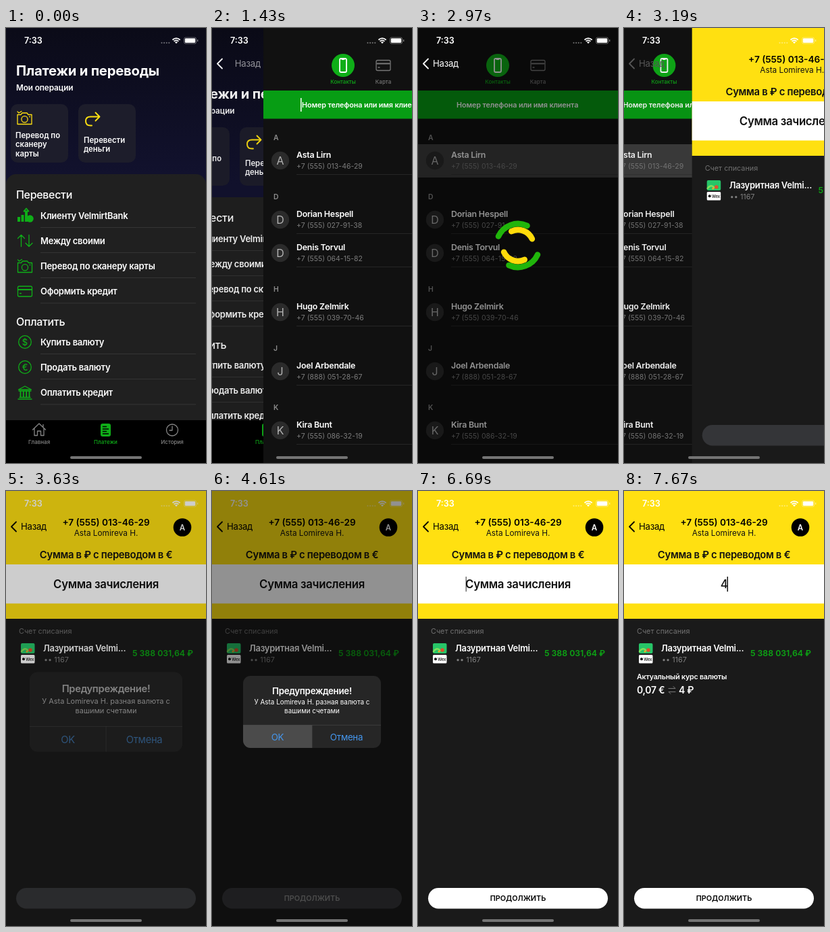
These frames come from a looping animation (296x640 px, 8000 ms). An HTML page with a canvas:

```html
<!DOCTYPE html>
<html lang="ru">
<head>
<meta charset="utf-8">
<title>Платежи</title>
<style>
html, body { margin: 0; width: 100%; height: 100%; overflow: hidden; background: #000; }
canvas { display: block; width: 296px; height: 640px; }
</style>
</head>
<body>
<canvas id="stage"></canvas>
<script>
const W = 296, H = 640, LOOP = 8000, NAV = 34;
const GREEN = '#0fae18', YELLOW = '#ffe011', BLUE = '#4597ee';
const canvas = document.getElementById('stage');
const c = canvas.getContext('2d');
const dpr = window.devicePixelRatio || 1;
canvas.width = W * dpr;
canvas.height = H * dpr;

const clamp = v => Math.max(0, Math.min(1, v));
const ramp = (t, a, b) => clamp((t - a) / (b - a));
// Critically damped spring from 0 to 1
const spring = (ms, w) => {
  const x = Math.max(0, ms) / 1000 * w;
  return 1 - (1 + x) * Math.exp(-x);
};
const settle = p => p > 0.993 ? 1 : p;

function text(s, x, y, size, weight = 600, color = '#fff', align = 'left', gap = -0.02) {
  c.font = `${weight} ${size}px Inter, "Noto Sans", sans-serif`;
  c.letterSpacing = `${gap * size}px`;
  c.textAlign = align;
  c.fillStyle = color;
  c.fillText(s, x, y);
}
function rect(x, y, w, h, color) {
  c.fillStyle = color;
  c.fillRect(x, y, w, h);
}
function round(x, y, w, h, r, color) {
  c.beginPath();
  c.roundRect(x, y, w, h, r);
  c.fillStyle = color;
  c.fill();
}
function disc(x, y, r, color) {
  c.beginPath();
  c.arc(x, y, r, 0, 7);
  c.fillStyle = color;
  c.fill();
}
function ring(x, y, r, color, lw = 1.3) {
  c.beginPath();
  c.arc(x, y, r, 0, 7);
  c.lineWidth = lw;
  c.strokeStyle = color;
  c.stroke();
}
function line(d, x, y, color, lw = 1.3) {
  c.save();
  c.translate(x, y);
  c.lineWidth = lw;
  c.lineCap = c.lineJoin = 'round';
  c.strokeStyle = color;
  c.stroke(new Path2D(d));
  c.restore();
}
function shifted(dx, dy, draw) {
  c.save();
  c.translate(dx, dy);
  draw();
  c.restore();
}
function faded(alpha, draw) {
  c.save();
  c.globalAlpha *= alpha;
  draw();
  c.restore();
}

// Icons
function camera(x, y, color) {
  line('M-10.5 -4.5h5l2-2.5h7l2 2.5h5v14h-21zM-10.5-9l2 2 4-2.5', x, y, color);
  ring(x, y + 2.3, 4.6, color);
  disc(x + 7.5, y - 1.5, 0.9, color);
}
function growth(x, y, color) {
  [[-11, 7], [-5.5, 10], [0, 15]].forEach(([dx, h]) => rect(x + dx, y + 9 - h, 4, h, color));
  line('M-1.5-6.5L2-10.5l3.5 4z', x, y, color, 1.8);
  disc(x + 7.5, y + 4.5, 5.2, color);
}
function swap(x, y, color) {
  line('M-5.5 8.5v-17M-10.5-3.5l5-5 5 5M6-8.5v17M1 3.5l5 5 5-5', x, y, color);
}
function card(x, y, color) {
  line('M-10.5-5.5q0-2 2-2h17q2 0 2 2v11q0 2-2 2h-17q-2 0-2-2zM-7.5 3h2', x, y, color);
  rect(x - 10, y - 3.6, 20, 2, color);
}
const coin = sign => (x, y, color) => {
  ring(x, y, 9.3, color);
  text(sign, x, y + 4.6, 13, 500, color, 'center', 0);
};
function bank(x, y, color) {
  line('M-9.5-4.5l9.5-5 9.5 5zM-9-2.5h18M-8 7h16M-10 9.5h20', x, y, color);
  line('M-6.5-2v8M-2.2-2v8M2.2-2v8M6.5-2v8', x, y, color, 1.8);
}

const rows = [
  [276, 'Клиенту VelmirtBank', growth], [313, 'Между своими', swap],
  [350, 'Перевод по сканеру карты', camera], [387.5, 'Оформить кредит', card],
  [462, 'Купить валюту', coin('$')], [499, 'Продать валюту', coin('€')],
  [536.5, 'Оплатить кредит', bank]
];

function homeContent() {
  text('Платежи и переводы', 15, 70, 20.3, 700, '#fff', 'left', -0.012);
  text('Мои операции', 15, 92, 11.8, 600, '#fff', 'left', -0.01);
  for (const x of [7, 107]) round(x, 112, 85, 86, 10, '#1d1d2b');
  camera(27.5, 132, YELLOW);
  ['Перевод по', 'сканеру', 'карты'].forEach((s, i) => text(s, 14, 161.5 + i * 13.5, 11.3, 600, '#fff', 'left', 0));
  line('M9-3.5H-3q-7 0-7 6.500t7 6.500h2M4.500-9.500l6 6L4.500 2.500', 128, 134, YELLOW, 1.9);
  ['Перевести', 'деньги'].forEach((s, i) => text(s, 115, 168.5 + i * 13.5, 11.3, 600, '#fff', 'left', 0));

  round(0, 215, W, 400, 15, '#202020');
  text('Перевести', 15, 251, 16, 500);
  text('Оплатить', 15, 438, 16, 500);
  for (const [y, label, icon] of rows) {
    icon(28, y, GREEN);
    text(label, 51, y + 4.7, 13);
    rect(51, y + 17, 230, 0.7, '#3d3d3d');
  }
}

function tabBar() {
  const gray = '#858585';
  rect(0, 577, W, 63, '#000');
  line('M-9.500 0L0-9l9.500 9M-7-2v10.500h4.500V2h5v6.500H7V-2M6-7.500v3', 49, 591, gray);
  round(140, 582, 15, 19, 3, GREEN);
  line('M-4-5h5M-4-1.500h8M-4 2h5M-4 5.500h8', 147.5, 591.5, '#000', 1.5);
  ring(246, 591.5, 8.5, gray);
  line('M0-5.500V.5h-4', 246, 591.5, gray);
  text('Главная', 49, 611.5, 8, 500, gray, 'center', 0);
  text('Платежи', 147.5, 611.5, 8, 500, GREEN, 'center', 0);
  text('История', 246, 611.5, 8, 500, gray, 'center', 0);
}

// The navigation bar, once there, moves the content down by drop
function home(drop) {
  const sky = c.createLinearGradient(0, 0, 0, 230);
  sky.addColorStop(0, '#0b0b18');
  sky.addColorStop(1, '#12122f');
  rect(0, 0, W, H, sky);
  shifted(0, drop, homeContent);
  tabBar();
}

const people = [
  [195, 'Asta Lirn', '+7 (555) 013-46-29', 1], [282, 'Dorian Hespell', '+7 (555) 027-91-38', 1],
  [331, 'Denis Torvul', '+7 (555) 064-15-82'], [418, 'Hugo Zelmirk', '+7 (555) 039-70-46', 1],
  [505, 'Joel Arbendale', '+7 (888) 051-28-67', 1], [592, 'Kira Bunt', '+7 (555) 086-32-19', 1]
];

function contacts(t) {
  rect(0, 0, W, H, '#111');
  disc(118, 55, 17, GREEN);
  line('M-5-8q0-2 2-2h6q2 0 2 2V8q0 2-2 2h-6q-2 0-2-2zM-1.500-9h3', 118, 55, '#fff', 1.8);
  text('Контакты', 118, 82, 8, 500, GREEN, 'center', 0);
  card(177.5, 55, '#777');
  text('Карта', 177.5, 82, 8, 500, '#777', 'center', 0);

  rect(0, 92, W, 41.5, '#079d14');
  text('Номер телефона или имя клиента', 57, 116.8, 10.8, 600, '#fff', 'left', -0.01);
  const caret = t < 2160 ? 1 : t < 2280 ? 0.5 : 0;
  faded(caret, () => rect(55, 103, 1.5, 20, '#fff'));

  if (t >= 2750) rect(0, 171, W, 49, '#3d3d3d');
  for (const [y, name, phone, first] of people) {
    if (first) text(name[0], 15, y - 30.5, 10.5, 600, '#8c8c8c');
    disc(25, y, 13.2, '#2b2b2b');
    text(name[0], 25, y + 5.7, 16, 400, '#b4b4b4', 'center', 0);
    text(name, 49, y - 4, 12.4, 600);
    text(phone, 49, y + 12, 10.5, 400, '#7b7b7b', 'left', 0);
    rect(49, y + 20, W, 0.7, '#303030');
  }
}

function loader(t) {
  const turn = (t - 2970) / 1000 * 360;
  const arc = (r, deg, color) => {
    for (const half of [0, 180]) {
      const a = (deg + half) * Math.PI / 180;
      c.beginPath();
      c.arc(148, 320, r, a, a + Math.PI / 2);
      c.strokeStyle = color;
      c.lineWidth = 8.6;
      c.lineCap = 'round';
      c.stroke();
    }
  };
  arc(32, -155 + turn, '#20b50b');
  arc(23, -115 - turn, '#ffdb0a');
}

function caretAlpha(t) {
  if (t < 5150) return 0;
  if (t >= 7160) return 1;
  const u = (t - 5310 + 1025) % 1025;
  return u < 110 ? 0.6 : u < 350 ? 0.25 : u < 470 ? 0.6 : 1;
}

function amount(t) {
  rect(0, 0, W, H, '#1a1a1a');
  rect(0, 0, W, 188, YELLOW);
  rect(0, 108, W, 57.5, '#fff');
  text('+7 (555) 013-46-29', 148, 51, 13.6, 600, '#000', 'center', 0);
  text('Asta Lomireva H.', 148, 66, 11.8, 400, '#111', 'center', 0);
  disc(261, 53.5, 13.3, '#000');
  text('A', 261, 57.7, 11.5, 600, '#fff', 'center', 0);
  text('Сумма в ₽ с переводом в €', 148, 98.5, 14.8, 600, '#111', 'center');

  const typed = t >= 7160;
  text(typed ? '4' : 'Сумма зачисления', 148, 143, 16.8, typed ? 500 : 600, '#111', 'center');
  faded(caretAlpha(t), () => rect(typed ? 152.5 : 70.5, 126, 1.5, 22, '#111'));

  text('Счет списания', 19, 210, 10.8, 400, '#707070', 'left', 0);
  round(22, 224, 20.5, 15, 2, '#27c568');
  line('M-8 0q5-7 10-1', 31, 236, '#82e05c', 2.5);
  disc(36, 234, 2.8, '#e0502d');
  disc(31, 236, 1.5, '#f3a929');
  round(22, 241, 20.5, 12.5, 1.5, '#fff');
  disc(26, 247.3, 2, '#111');
  text('Wex', 29.2, 249.5, 6, 500, '#111');
  text('Лазуритная Velmi...', 55, 236, 13);
  text('•• 1167', 56, 251.5, 10.8, 400, '#808080', 'left', 0);
  text('5 388 031,64 ₽', 277, 243, 12.3, 600, '#0ca514', 'right', 0);

  if (t >= 7310) {
    text('Актуальный курс валюты', 19, 277.3, 10.7);
    text('0,07 €', 19, 298, 14, 600);
    line('M-5-2.500H5l-3-3M5 2.500H-5l3 3', 71, 293, '#777', 1);
    text('4 ₽', 81, 298, 14, 600);
  }

  const ready = t >= 5040;
  round(15, 584, 266, 30.5, 15.2, ready ? '#fff' : '#343538');
  if (t >= 3730) text('ПРОДОЛЖИТЬ', 148, 603, 10.8, 600, ready ? '#000' : '#858585', 'center', 0);
}

function alertBox(pressed, scale) {
  c.save();
  c.translate(148, 325);
  c.scale(scale, scale);
  c.beginPath();
  c.roundRect(-102, -53, 204, 106, 11);
  c.clip();
  rect(-102, -53, 204, 106, '#262626');
  if (pressed) rect(-102, 19, 102, 34, '#4b4b4b');
  rect(-102, 19, 204, 0.7, '#464646');
  rect(-0.3, 19, 0.7, 34, '#464646');
  text('Предупреждение!', 0, -26, 13.3, 600, '#fff', 'center');
  text('У Asta Lomireva H. разная валюта с', 0, -11, 9.9, 400, '#fff', 'center', 0);
  text('вашими счетами', 0, 1.5, 9.9, 400, '#fff', 'center', 0);
  text('OK', -51, 41.5, 13.3, 400, BLUE, 'center');
  text('Отмена', 51, 41.5, 13.3, 400, BLUE, 'center');
  c.restore();
}

function back(p, tint) {
  faded(Math.min(1, p * 1.3), () => line('M4-7l-7 7 7 7', 11, 52.5, tint, 1.8));
  faded(p * p, () => text('Назад', 22 + 46 * (1 - p), 57, 13.2, 400, tint));
}

function statusBar() {
  text('7:33', 27, 23.3, 12.6, 600, '#fff', 'left', 0);
  for (let i = 0; i < 4; i++) disc(230.5 + i * 3.6, 21.8, 1.1, 'rgba(255,255,255,.4)');
  c.strokeStyle = '#fff';
  c.lineCap = 'butt';
  for (const r of [4.8, 7.8]) {
    c.beginPath();
    c.arc(252, 23, r, -2.36, -0.78);
    c.lineWidth = 1.8;
    c.stroke();
  }
  c.beginPath();
  c.moveTo(252, 23);
  c.arc(252, 23, 2.8, -2.36, -0.78);
  c.fillStyle = '#fff';
  c.fill();
  line('M0 2q0-2 2-2h14q2 0 2 2v5q0 2-2 2h-14q-2 0-2-2z', 263.5, 14, 'rgba(255,255,255,.45)', 0.8);
  round(264.8, 15.3, 15.4, 6.4, 1.3, '#fff');
  rect(283, 17, 1.2, 3, 'rgba(255,255,255,.5)');
}

function push(p, under, over) {
  if (p < 1) {
    shifted(-0.3 * W * p, 0, under);
    rect(0, 0, W, H, `rgba(0,0,0,${0.1 * p})`);
  }
  shifted(W * (1 - p), 0, over);
}

function draw(t) {
  // The screen moves at about nine pictures a second
  const T = Math.floor((t + 10) / 110) * 110;
  c.setTransform(dpr, 0, 0, dpr, 0, 0);

  const p1 = settle(spring(T - 1195, 11.3));
  const p2 = settle(spring(T - 2990, 11.3));
  const waiting = ramp(T, 2650, 2860);
  const list = () => {
    contacts(t);
    if (p2 === 0) rect(0, 0, W, H, `rgba(0,0,0,${0.43 * waiting})`);
  };

  if (p2 > 0) push(p2, list, () => amount(t));
  else if (p1 > 0) push(p1, () => home(NAV), list);
  else home(0);

  const shade = Math.round(255 * (1 - p2));
  if (p1 > 0) back(p1, `rgb(${shade},${shade},${shade})`);
  if (p2 === 0 && t >= 2750) faded(waiting, () => loader(T));
  statusBar();

  const shown = spring(T - 3560, 22);
  const gone = ramp(T, 4680, 5040);
  const alpha = shown * (1 - gone) ** 2;
  if (alpha > 0.003) {
    rect(0, 0, W, H, `rgba(0,0,0,${0.43 * alpha})`);
    faded(alpha, () => alertBox(t >= 4610, 1.2 - 0.2 * shown));
  }
  round(95, 630, 106, 4, 2, '#747474');
}

function tick(now) {
  draw(now % LOOP);
  requestAnimationFrame(tick);
}
requestAnimationFrame(tick);
</script>
</body>
</html>
```
